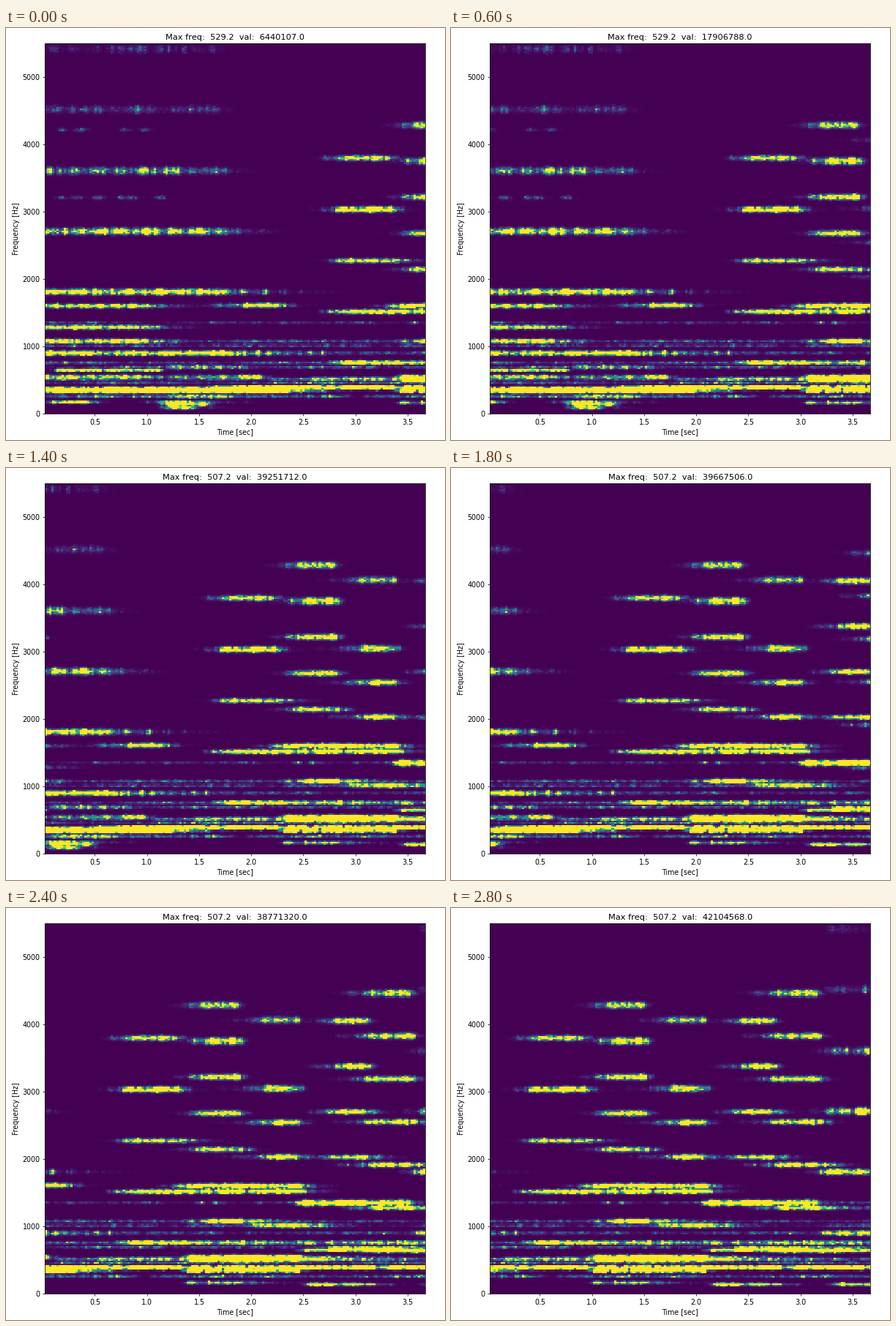
A matplotlib script that plays this animation: 600x563 px, repeating every 3000 ms.

```python
import numpy as np
import matplotlib.pyplot as plt
from matplotlib.animation import FuncAnimation

W, H, DPI = 600, 563, 64
LEFT, TOP, RIGHT, BOTTOM = 53, 20.5, 573, 527
PX_PER_SEC = 142.5
RATE, HOP, CHUNK = 11025, 250, 2048
DF = 22.05
T0 = 0.0193
ROWS, COLS = 250, 270
END = 930

rng = np.random.default_rng(11)
xs = LEFT + (np.arange(COLS) + 0.5) * HOP / RATE * PX_PER_SEC
rows = np.arange(ROWS) + 0.5
spec = np.zeros((ROWS, COLS))


def tone(hz, on, off, level, attack=3, release=4, spread=1.1, rough=0.55):
    """Add one partial; on and off are pixels along the time axis at time zero."""
    rise = np.clip(on - xs, 0, None) / attack
    fall = np.clip(xs - off, 0, None) / release
    beat = np.convolve(rng.normal(size=COLS), [0.8, 0.6], "same")
    grain = rng.normal(size=spec.shape) * 0.4
    drop = ((rows - hz / DF) / spread) ** 2
    power = np.exp(rough * beat - rise - fall + grain - drop[:, None])
    np.maximum(spec, level * power, out=spec)


def note(base, on, off, partials, attack=8, ring=60):
    """A note whose upper partials are weaker, wider and die away sooner."""
    for k in partials:
        tone(k * base, on, off, 3 * np.exp(-k / 9), attack,
             ring / k ** 1.5, 0.9 + 0.09 * k)


def call(on, off, attack, ring):
    """The 901 Hz call, strong up to its third partial."""
    for k in range(1, 7):
        level = 2.0 / (1 + (k / 3.2) ** 6)
        tone(k * 901, on, off, level, attack, ring / k, 1 + 0.22 * k, 0.7)


def chord(pitches, on, off, level, **kw):
    for hz in pitches:
        tone(hz, on, off, level, **kw)


# opening
call(LEFT, 285, 3, 60)
chord([540, 1070, 1280, 1600], LEFT, 185, 1.7, release=18)
chord([645], 72, 206, 2.2, spread=0.8)
chord([540, 690], 225, 300, 0.7, release=20)
tone(1610, 337, 367, 1.8, attack=20, release=10)
tone(540, 312, 347, 1.8)
for _ in range(22):
    x = rng.uniform(LEFT, 230)
    tone(rng.choice([3200, 3200, 3620, 4210, 4500]), x, x + rng.uniform(1, 7), 0.22)

# faint lines that swell and fade through the whole recording
for hz in (260, 455, 510, 690, 757, 905, 1010, 1070, 1350):
    for start in np.arange(LEFT, END, 45):
        tone(hz, start, start + 40, 0.7 * rng.uniform(0.1, 1) * np.exp(-hz / 1100),
             release=8, spread=0.8)

# deep drones
tone(350, LEFT, 365, 8, release=20, spread=1.15)
tone(385, 340, 530, 6, attack=30, spread=0.9)
chord([385], 694, 794, 6, spread=0.9)
chord([385], 809, END, 6, spread=0.9)
tone(260, 226, 300, 0.9)
tone(175, 65, 108, 1.8, attack=6, release=8, spread=0.8)
tone(175, 215, 245, 1.6, attack=8, release=20, spread=0.8)
tone(145, 220, 270, 3)
tone(95, 222, 244, 1.5, release=12)
tone(165, 540, 606, 1.0, release=25, spread=0.8)
tone(140, 707, 765, 2.5, release=15, spread=0.8)
tone(140, 870, END, 1.6, spread=0.8)

# melody
note(757, 461, 525, range(1, 6))
note(535, 566, 609, range(1, 9), attack=11)
note(507, 657, 688, [1, 2, 3, 4, 5, 6, 8], attack=15)
note(674, 745, 783, range(1, 7), attack=10)
note(636, 795, 845, range(1, 8), attack=12)
call(868, END, 9, 10)

# held tones under the melody
tone(510, 420, 535, 1.0)
chord([350, 385], 538, 690, 2.2, rough=0.8)
chord([495, 515, 540], 542, 690, 2.8)
chord([1520, 1600], 540, 688, 2.4, attack=10, release=10)
tone(757, 500, END, 0.9, rough=0.7)
tone(1345, 694, 838, 2.6, release=6, spread=1.3)
tone(645, 700, END, 2.2, spread=0.8)
tone(510, 694, 725, 1.8)

fig = plt.figure(figsize=(W / DPI, H / DPI), dpi=DPI, facecolor="white")
plt.rcParams["font.family"] = "DejaVu Sans"


def pt(px):
    return px * 72 / DPI


def label(x, y, text, size, **kw):
    return fig.text(x / W, 1 - y / H, text, fontsize=pt(size), ha="center", **kw)


ax = fig.add_axes([LEFT / W, 1 - BOTTOM / H, (RIGHT - LEFT) / W, (BOTTOM - TOP) / H])
image = ax.imshow(spec, cmap="viridis", vmin=0, vmax=1, origin="lower",
                  aspect="auto", interpolation="nearest")
ax.set_autoscale_on(False)
ax.set_xlim(T0, T0 + (RIGHT - LEFT) / PX_PER_SEC)
ax.set_ylim(0, 5500)
ax.set_xticks(np.arange(0.5, 3.6, 0.5))
ax.set_yticks(range(0, 5001, 1000))
ax.tick_params(labelsize=pt(9.5), length=pt(3.25), width=pt(0.75), pad=pt(3.25))
for spine in ax.spines.values():
    spine.set_linewidth(pt(0.75))

label(313.2, 552, "Time [sec]", 9.5, va="center")
label(14, 274, "Frequency [Hz]", 9.5, va="center", rotation=90)
title = label(313.2, 16, "", 11.4, va="baseline")

# audio chunks received and loudest value at a few ticks
TICKS = [0, 3, 5, 7, 10, 12, 14]
CHUNKS = [0, 2, 4, 6, 10, 11, 13]
PEAKS = [6440107, 17906788, 41607404, 39251712, 39875404, 38771320, 42104568]


def draw(i):
    chunks = int(np.interp(i, TICKS, CHUNKS) + 1e-6)
    start = T0 - chunks * CHUNK / RATE
    image.set_extent([start, start + COLS * HOP / RATE, 0, ROWS * DF])
    peak = int(np.interp(i, TICKS, PEAKS))
    freq = 24 * DF if i < 4 else 23 * DF
    title.set_text(f"Max freq:  {freq:.1f}  val:  {peak}.0")
    return image, title


anim = FuncAnimation(fig, draw, frames=15, interval=200, repeat=True)
plt.show()
```
